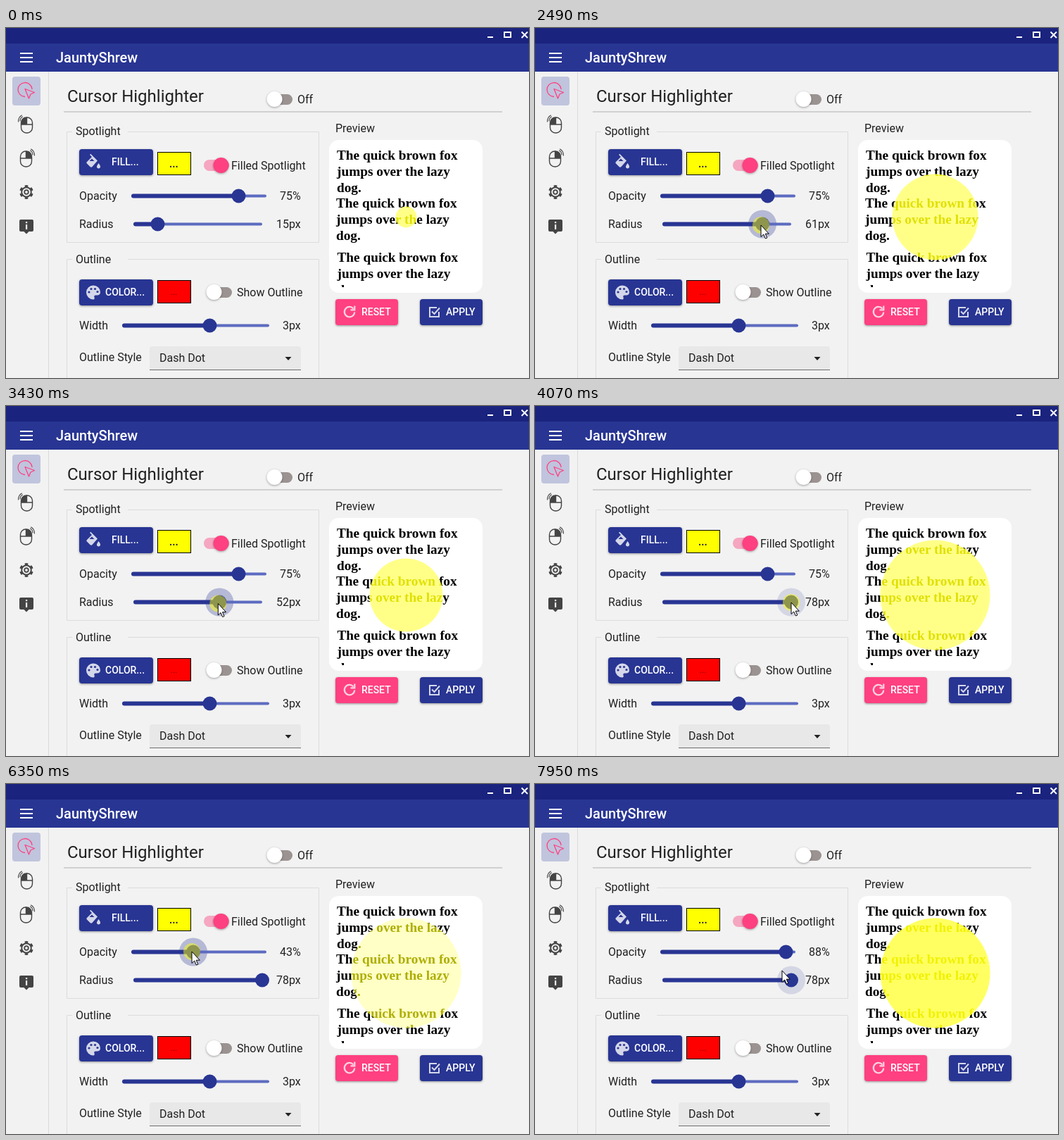
These frames come from a looping animation (743 px wide and 497 px high, 7.99 s). An HTML page:

```html
<!DOCTYPE html>
<html lang="en">
<head>
<meta charset="utf-8">
<title>Cursor Highlighter</title>
<style>
  html, body { margin: 0; width: 100%; height: 100%; overflow: hidden; background: #f2f2f2; }
  svg { display: block; width: 743px; height: 497px; }
  text { font: 16px Roboto, sans-serif; fill: #212121; }
  .caps { font-size: 14px; font-weight: 500; fill: #fff; }
  .quote { font: bold 19.3px "Liberation Serif", "Times New Roman", serif; fill: inherit; }
  .btn { filter: drop-shadow(0 1px 1.5px rgba(0, 0, 0, .4)); }
  .thumb { filter: drop-shadow(0 1px 1.5px rgba(0, 0, 0, .35)); }
  .line { fill: none; stroke-linecap: round; stroke-linejoin: round; }
</style>
</head>
<body>
<svg viewBox="0 0 743 497">
  <defs>
    <clipPath id="page"><rect x="459" y="159" width="218" height="209"/></clipPath>
    <clipPath id="spot"><circle id="spotShape" cx="568.5" cy="268.5" r="15"/></clipPath>
    <g id="mouse" class="line" stroke="#444" stroke-width="1.4">
      <rect x="-8" y="-11" width="16" height="22" rx="7.5"/>
      <path d="M-8 -1H8M0 -11V-1"/>
    </g>
    <path id="pressedHalf" d="M0 -11V-1H-8V-4Q-7.5 -11 0 -11Z" fill="#444"/>
    <path id="waves" class="line" d="M-9.5 -6Q-9.5 -10 -6 -12M-12 -5Q-12 -11.5 -7 -14" stroke="#444" stroke-width="1.1"/>
    <g id="quote">
      <text class="quote" x="470" y="187">The quick brown fox</text>
      <text class="quote" x="470" y="210">jumps over the lazy</text>
      <text class="quote" x="470" y="233">dog.</text>
      <text class="quote" x="469" y="255">The quick brown fox</text>
      <text class="quote" x="469" y="278">jumps over the lazy</text>
      <text class="quote" x="469" y="301">dog.</text>
      <text class="quote" x="470.5" y="332">The quick brown fox</text>
      <text class="quote" x="470.5" y="355">jumps over the lazy</text>
      <text class="quote" x="470.5" y="378">dog.</text>
    </g>
  </defs>

  <rect width="743" height="497" fill="#f2f2f2"/>

  <!-- title bars -->
  <rect width="743" height="22" fill="#1a237e"/>
  <rect y="22" width="743" height="40" fill="#283593"/>
  <g fill="none" stroke="#fff" stroke-width="2">
    <path d="M684 13H692M732.5 5.5L741 14M741 5.5L732.5 14"/>
    <rect x="708" y="6" width="9" height="7"/>
    <path d="M20 36H38M20 42H38M20 48H38"/>
  </g>
  <text x="71" y="49" style="font-size:20px;font-weight:500;fill:#fff">JauntyShrew</text>

  <!-- side bar -->
  <path d="M60.5 62V497" stroke="#dadada"/>
  <rect x="9" y="69" width="40" height="41" rx="4" fill="#c0c4dd"/>
  <g class="line" stroke="#ff4081" stroke-width="1.3">
    <path d="M26.5 97.5A10 10 0 1 1 37 86.5"/>
    <path d="M27 86.5L40.5 91.5L35 94L32.5 100Z"/>
  </g>
  <g transform="translate(29.5 138)"><use href="#mouse"/><use href="#pressedHalf"/><use href="#waves"/></g>
  <g transform="translate(28.5 186) scale(-1 1)"><use href="#mouse"/><use href="#pressedHalf"/><use href="#waves"/></g>
  <g fill="none" stroke="#444">
    <circle cx="29" cy="233" r="6.8" stroke-width="2"/>
    <circle cx="29" cy="233" r="8.6" stroke-width="2.6" pathLength="12" stroke-dasharray="1 1" stroke-dashoffset="-.5"/>
    <circle cx="29" cy="233" r="2.8" stroke-width="1.8"/>
  </g>
  <path d="M21 272H37Q39 272 39 274V287Q39 289 37 289H32.5L29 292.5L25.5 289H21Q19 289 19 287V274Q19 272 21 272Z" fill="#444"/>
  <path d="M28 275H30.2V277.3H28ZM28 279H30.2V286H28Z" fill="#f2f2f2"/>

  <!-- heading -->
  <text x="87" y="105" style="font-size:24px">Cursor Highlighter</text>
  <path d="M82 119H705" stroke="#d0d0d0" stroke-width="2"/>
  <rect x="371" y="94" width="36" height="15" rx="7.5" fill="#9b9391"/>
  <circle class="thumb" cx="381.5" cy="101" r="11" fill="#fff"/>
  <text x="414" y="107">Off</text>

  <!-- group boxes -->
  <g fill="none" stroke="#dcdcdc">
    <path d="M94 147.5H86.5V304.5H444.5V147.5H173"/>
    <path d="M94 328.5H86.5V500M444.5 500V328.5H173"/>
  </g>
  <text x="99" y="152">Spotlight</text>
  <text x="99" y="334">Outline</text>

  <!-- spotlight row -->
  <rect id="fillBtn" class="btn" x="104" y="172" width="105" height="37" rx="4" fill="#283593"/>
  <text class="caps" x="150" y="195">FILL...</text>
  <g fill="#d4d7e9">
    <path d="M114.5 190.5L122 183L119 180L120.3 178.8L130 188.5L122.5 197Q121 198.5 119.5 197L114.5 192Z"/>
    <path d="M131.5 192Q134.5 195.5 134 197.5Q133.4 199.5 131.5 199.5Q129.6 199.5 129 197.5Q128.7 195.5 131.5 192Z"/>
  </g>
  <path d="M118.5 189H125.5L122 185.5Z" fill="#283593"/>
  <rect x="215.5" y="176.5" width="47" height="32" fill="#ff0" stroke="#000"/>
  <text x="232" y="198" style="font-weight:700;font-size:14.5px">...</text>
  <rect x="281" y="187" width="36" height="16" rx="8" fill="#f5a6c0"/>
  <circle class="thumb" cx="305.5" cy="195" r="11" fill="#ff4081"/>
  <text x="320" y="201">Filled Spotlight</text>

  <!-- outline row -->
  <rect class="btn" x="104" y="357" width="105" height="37" rx="4" fill="#283593"/>
  <text class="caps" x="141" y="380">COLOR...</text>
  <path d="M124 365.5A10 10 0 1 0 124 385.5Q126.5 385 125.5 382.5Q124.5 379.5 127.5 379.5H130Q134 379 134 375A10 9.5 0 0 0 124 365.5Z" fill="#d4d7e9"/>
  <g fill="#283593">
    <circle cx="118" cy="375" r="1.6"/><circle cx="121" cy="370.5" r="1.6"/>
    <circle cx="126.5" cy="370.5" r="1.6"/><circle cx="130" cy="374.5" r="1.6"/>
  </g>
  <rect x="215.5" y="358.5" width="47" height="32" fill="#f00" stroke="#000"/>
  <text x="234" y="379" style="font-size:12px;fill:#7a0000">...</text>
  <rect x="285" y="368" width="36" height="15" rx="7.5" fill="#9b9391"/>
  <circle class="thumb" cx="295.5" cy="375" r="11" fill="#fff"/>
  <text x="328" y="381">Show Outline</text>

  <g id="sliders"></g>

  <text x="104" y="473">Outline Style</text>
  <path d="M204 456Q204 452 208 452H415Q419 452 419 456V486H204Z" fill="#e8e8e8"/>
  <path d="M204 485.5H419" stroke="#6e6e6e"/>
  <text x="218" y="474">Dash Dot</text>
  <path d="M396.5 467H405.5L401 472Z" fill="#222"/>

  <!-- preview -->
  <text x="468" y="148">Preview</text>
  <rect x="459" y="159" width="218" height="217" rx="14" fill="#fff"/>
  <g clip-path="url(#page)"><use href="#quote" fill="#000"/></g>
  <g clip-path="url(#spot)">
    <rect id="spotFill" x="459" y="159" width="218" height="217"/>
    <g clip-path="url(#page)"><use id="spotText" href="#quote"/></g>
  </g>

  <rect class="btn" x="468" y="385" width="89" height="37" rx="4" fill="#ff4081"/>
  <g stroke="#ffd3e1" stroke-width="2.2" fill="none">
    <path d="M493.5 398.5A7.2 7.2 0 1 0 495.2 403.5"/>
    <path d="M495.3 394.5V400.3H489.5"/>
  </g>
  <text class="caps" x="505" y="408">RESET</text>
  <rect class="btn" x="588" y="385" width="89" height="37" rx="4" fill="#283593"/>
  <g stroke="#d4d7e9" stroke-width="2" fill="none">
    <path d="M612 397H602V410H615V403"/>
    <path d="M605 402.5L608.5 406L616 397.5"/>
  </g>
  <text class="caps" x="625" y="408">APPLY</text>

  <g id="cursor">
    <circle id="press" r="12" fill="#ff0" opacity=".48"/>
    <path d="M0 0V16.5L3.7 13L6.4 19L8.8 18L6.2 12.2H11.3Z" fill="#fff" stroke="#000" stroke-linejoin="round"/>
  </g>
</svg>

<script>
const LOOP = 7990;
const $ = id => document.getElementById(id);

// pointer path: time, x, y
const PATH = [
  [130, 660, 478], [290, 216, 139], [490, 216, 139], [660, 196, 184],
  [1420, 196, 184], [1740, 228, 263], [1860, 213, 277],
  [2140, 213, 277], [2600, 355, 281], [2910, 340, 282], [2960, 338, 282],
  [3330, 280, 281], [3720, 363, 279], [3760, 363, 279], [3790, 358.5, 279], [3820, 364, 279],
  [4070, 364, 279], [4620, 328, 236],
  [4880, 328, 236], [4960, 326, 236], [5380, 382, 235],
  [5920, 382, 235], [6350, 264, 238], [6620, 198, 238],
  [6820, 198, 238], [7450, 366, 238], [7590, 358, 238], [7640, 354.5, 238],
  [7700, 354.5, 238], [7950, 351, 265]
];
const DRAGS = { radius: [2140, 4070], opacity: [4880, 7680] };
const GRAB = 2;

function pointer(t) {
  const i = PATH.findIndex(k => k[0] > t);
  if (i === 0) return PATH[0].slice(1);
  if (i < 0) return PATH[PATH.length - 1].slice(1);
  const [t0, x0, y0] = PATH[i - 1], [t1, x1, y1] = PATH[i];
  const p = (t - t0) / (t1 - t0);
  return [x0 + (x1 - x0) * p, y0 + (y1 - y0) * p];
}

function add(parent, tag, attrs) {
  const el = document.createElementNS('http://www.w3.org/2000/svg', tag);
  for (const k in attrs) el.setAttribute(k, attrs[k]);
  return parent.appendChild(el);
}

function makeSlider(name, y, left, right, valueX) {
  const g = $('sliders');
  const line = (color, w) => add(g, 'line', {
    x1: left + 2, x2: right - 2, y1: y, y2: y, stroke: color, 'stroke-width': w, 'stroke-linecap': 'round'
  });
  const halo = add(g, 'circle', { cy: y, r: 20, fill: '#283593', opacity: 0 });
  line('#5c6bc0', 4);
  const bar = line('#283593', 6);
  const knob = add(g, 'circle', { cy: y, r: 10, fill: '#283593' });
  add(g, 'text', { x: 104, y: y + 5.5 }).textContent = name;
  const label = add(g, 'text', { x: valueX, y: y + 5.5 });
  return {
    y, left, right,
    set(x, text, glow) {
      knob.setAttribute('cx', x);
      halo.setAttribute('cx', x);
      bar.setAttribute('x2', x);
      halo.setAttribute('opacity', glow);
      label.textContent = text;
    }
  };
}

const opacity = makeSlider('Opacity', 238.5, 179, 370, 389);
const radius = makeSlider('Radius', 278.5, 182, 364, 384);
makeSlider('Width', 422.5, 166, 374, 393).set(289.5, '3px', 0);

const during = (t, [a, b]) => t >= a && t < b;

function knobAt(t, [start, end], right, rest) {
  if (t < start) return rest;
  return Math.min(right, pointer(Math.min(t, end))[0] + GRAB);
}

function glow(s, drag, t, x, y) {
  if (during(t, drag)) return .3;
  const over = t >= 130 && Math.abs(y - s.y) < 16 && x > s.left && x < s.right + 10;
  return over ? .15 : 0;
}

// blend in linear light
const gamma = v => Math.round(255 * Math.pow(v, 1 / 2.2));

function draw(t) {
  const [x, y] = pointer(t);
  const rx = knobAt(t, DRAGS.radius, radius.right, 215.5);
  const ox = knobAt(t, DRAGS.opacity, opacity.right, 330.5);
  const size = Math.round(15 + (rx - 215) / 2.365);
  const percent = Math.round((ox - 179.5) / 2.005);
  const a = percent / 100;

  radius.set(rx, size + 'px', glow(radius, DRAGS.radius, t, x, y));
  opacity.set(ox, percent + '%', glow(opacity, DRAGS.opacity, t, x, y));

  $('spotShape').setAttribute('r', size);
  $('spotFill').setAttribute('fill', `rgb(255,255,${gamma(1 - a)})`);
  $('spotText').setAttribute('fill', `rgb(${gamma(a)},${gamma(a)},0)`);

  const onFill = x > 104 && x < 209 && y > 172 && y < 209;
  $('fillBtn').setAttribute('fill', onFill ? '#424ea2' : '#283593');

  const down = during(t, [2140, 4100]) || during(t, DRAGS.opacity);
  $('press').style.display = down ? '' : 'none';
  $('cursor').style.display = t < 130 ? 'none' : '';
  $('cursor').setAttribute('transform', `translate(${x.toFixed(1)} ${y.toFixed(1)})`);
}

let begin;
function tick(now) {
  begin ??= now;
  draw((now - begin) % LOOP);
  requestAnimationFrame(tick);
}
draw(0);
requestAnimationFrame(tick);
</script>
</body>
</html>
```
